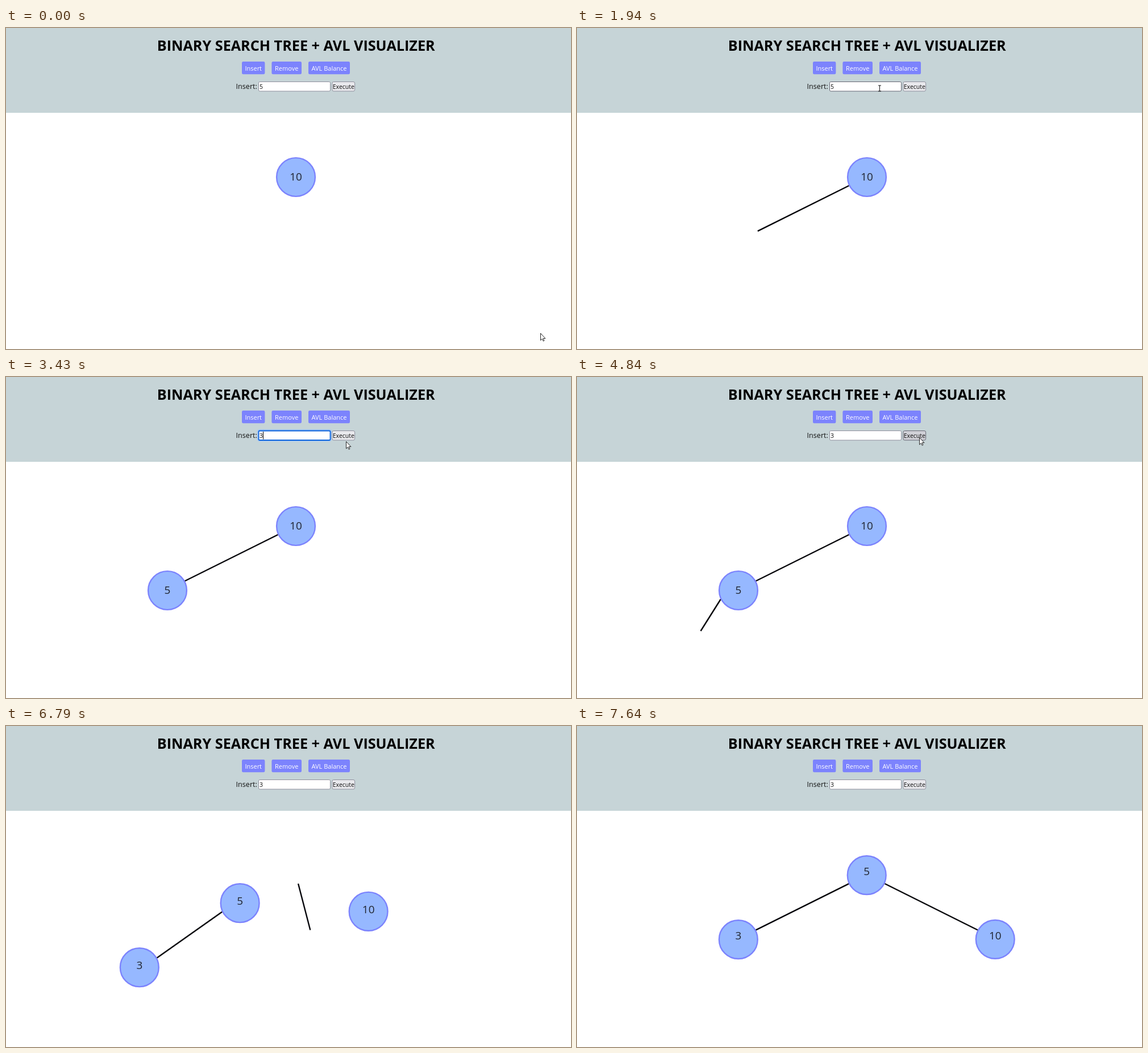
An HTML page with a canvas that plays this animation: 994x564 px, repeating every 9.06 s.

```html
<!DOCTYPE html>
<html lang="en">
<head>
<meta charset="utf-8">
<title>Binary Search Tree + AVL Visualizer</title>
<style>
html, body { margin: 0; width: 100%; height: 100%; overflow: hidden; background: #fff; }
canvas { display: block; width: 994px; height: 564px; }
</style>
</head>
<body>
<canvas id="stage" width="994" height="564"></canvas>
<script>
const ctx = document.getElementById('stage').getContext('2d');
const LOOP = 9060;
const FONT = '"Open Sans", "Noto Sans", sans-serif';

// Moments in ms
const PRESS_A = 1310, EDGE_A = 1380, NODE_A = 2380;
const FOCUS = 2490, ERASE = 2950, TYPE = 3350;
const PRESS_B = 4600, EDGE_B = 4672, NODE_B = 5674, ROTATE = 6671;
const CARET_OFF = 3950, CARET_ON = 4430, CURSOR_OUT = 6480;

const TOP = [510, 262], LEFT = [284, 375], RIGHT = [736, 375], LOW = [171, 488];

// Cursor keys: time, x, y
const CURSOR = [
  [30, 940, 536], [700, 569, 134], [920, 599, 105],
  [1420, 599, 105], [1930, 532, 106], [2180, 524, 106],
  [3290, 524, 106], [3350, 570, 129], [3430, 598, 113], [3590, 602, 109],
  [3850, 602, 109], [3970, 602, 106],
  [5870, 602, 106], [6050, 677, 174], [6450, 918, 541]
];

const clamp = v => Math.min(1, Math.max(0, v));
const lerp = (a, b, k) => a + (b - a) * k;
const mix = (p, q, k) => [lerp(p[0], q[0], k), lerp(p[1], q[1], k)];
const smooth = k => k * k * (3 - 2 * k);

// One second exponential ease-out
function expoOut(t, start) {
  const p = clamp((t - start) / 1000);
  return p <= 0 ? 0 : p >= 1 ? 1 : 1 - 2 ** (-10 * p);
}

function text(str, x, y, size, color, align = 'left', weight = 400) {
  ctx.font = `${weight} ${size}px ${FONT}`;
  ctx.textAlign = align;
  ctx.fillStyle = color;
  ctx.fillText(str, x, y);
}

function box(x, y, w, h, r, fill, stroke, width = 1) {
  ctx.beginPath();
  ctx.roundRect(x, y, w, h, r);
  if (fill) { ctx.fillStyle = fill; ctx.fill(); }
  if (stroke) { ctx.strokeStyle = stroke; ctx.lineWidth = width; ctx.stroke(); }
}

function edge([x1, y1], [x2, y2], grow = 1) {
  if (grow <= 0) return;
  ctx.strokeStyle = '#05050a';
  ctx.lineWidth = 2.4;
  ctx.beginPath();
  ctx.moveTo(x1, y1);
  ctx.lineTo(lerp(x1, x2, grow), lerp(y1, y2, grow));
  ctx.stroke();
}

function node(label, [x, y], lift, alpha = 1) {
  if (alpha <= 0) return;
  ctx.globalAlpha = alpha;
  ctx.beginPath();
  ctx.arc(x, y, 33.9, 0, 7);
  ctx.fillStyle = '#96b8ff';
  ctx.fill();
  ctx.strokeStyle = '#7c83fd';
  ctx.lineWidth = 2.4;
  ctx.stroke();
  text(label, x, y + 6.4 - lift, 18.9, '#20242e', 'center');
  ctx.globalAlpha = 1;
}

function cursorAt(t) {
  if (t <= CURSOR[0][0]) return CURSOR[0].slice(1);
  for (let i = 1; i < CURSOR.length; i++) {
    const a = CURSOR[i - 1], b = CURSOR[i];
    if (t < b[0]) return mix(a.slice(1), b.slice(1), smooth((t - a[0]) / (b[0] - a[0])));
  }
  return CURSOR[CURSOR.length - 1].slice(1);
}

const inside = ([px, py], x, y, w, h) => px >= x && px <= x + w && py >= y && py <= y + h;

function arrow(x, y) {
  const pts = [[0, 0], [0, 12.4], [2.8, 9.8], [4.7, 13.8], [6.4, 13], [4.6, 9.1], [8.4, 9.1]];
  ctx.beginPath();
  pts.forEach(([dx, dy]) => ctx.lineTo(x + dx + 0.5, y + dy + 0.4));
  ctx.closePath();
  ctx.fillStyle = '#fff';
  ctx.fill();
  ctx.strokeStyle = '#111';
  ctx.lineWidth = 0.9;
  ctx.stroke();
}

function beam(x, y) {
  ctx.strokeStyle = '#111';
  ctx.lineWidth = 1;
  ctx.beginPath();
  ctx.moveTo(x - 2, y - 5); ctx.lineTo(x + 3, y - 5);
  ctx.moveTo(x + 0.5, y - 5); ctx.lineTo(x + 0.5, y + 5);
  ctx.moveTo(x - 2, y + 5); ctx.lineTo(x + 3, y + 5);
  ctx.stroke();
}

function header() {
  ctx.fillStyle = '#c6d4d7';
  ctx.fillRect(0, 0, 994, 149);
  text('BINARY SEARCH TREE + AVL VISUALIZER', 510.2, 40, 25.2, '#000', 'center', 700);
  [['Insert', 415, 40.4], ['Remove', 467.4, 52.6], ['AVL Balance', 532, 73]].forEach(([label, x, w]) => {
    box(x, 59, w, 22.3, 2.4, '#7c83fd');
    text(label, x + w / 2, 75, 11, '#fff', 'center');
  });
  text('Insert:', 404.6, 107, 12.6, '#111');
}

function form(t, mouse) {
  const focused = t >= FOCUS && t < PRESS_B;
  const overInput = mouse && inside(mouse, 444, 94, 127, 17);
  const overButton = mouse && inside(mouse, 573, 94, 41, 17);
  const pressed = (t >= PRESS_A && t < EDGE_A) || (t >= PRESS_B && t < EDGE_B);

  if (focused) {
    box(443.2, 93.2, 128.6, 18.9, 3, null, 'rgba(150,195,255,0.6)', 3);
    box(444.5, 94.5, 126, 16.5, 2, '#fff', '#0a62dc', 1.8);
  } else {
    box(444.5, 94.5, 126, 16.5, 2, '#fff', overInput ? '#676774' : '#8f8f9d');
  }
  const value = t < ERASE ? '5' : t < TYPE ? '' : '3';
  text(value, 446, 107, 10.5, '#111');
  if (focused && !(t >= CARET_OFF && t < CARET_ON)) {
    ctx.fillStyle = '#000';
    ctx.fillRect(value ? 452 : 446, 96, 1, 13.5);
  }

  box(573.8, 94.5, 39.8, 16.5, 2.6,
    pressed ? '#b1b1b9' : overButton ? '#d0d0d7' : '#e9e9ed',
    overButton ? '#676774' : '#8f8f9d');
  text('Execute', 593.8, 107, 10.5, '#111', 'center');

  if (mouse) (overInput ? beam : arrow)(...mouse);
}

function tree(t) {
  const turn = expoOut(t, ROTATE);
  const lift = 6.2 * turn;
  edge(mix([478.5, 277], [541.5, 277], turn), mix([314.5, 358.5], [705.5, 358.5], turn), expoOut(t, EDGE_A));
  edge(mix([252.8, 390.5], [478.5, 277], turn), mix([201.8, 471.3], [314.5, 358.5], turn), expoOut(t, EDGE_B));
  node('10', mix(TOP, RIGHT, turn), lift);
  node('5', mix(LEFT, TOP, turn), lift, expoOut(t, NODE_A));
  node('3', mix(LOW, LEFT, turn), lift, expoOut(t, NODE_B));
}

function draw(t) {
  ctx.fillStyle = '#fff';
  ctx.fillRect(0, 0, 994, 564);
  header();
  tree(t);
  form(t, t < CURSOR_OUT ? cursorAt(t) : null);
}

const begin = performance.now();
function tick() {
  draw((performance.now() - begin) % LOOP);
  requestAnimationFrame(tick);
}
tick();
</script>
</body>
</html>
```
